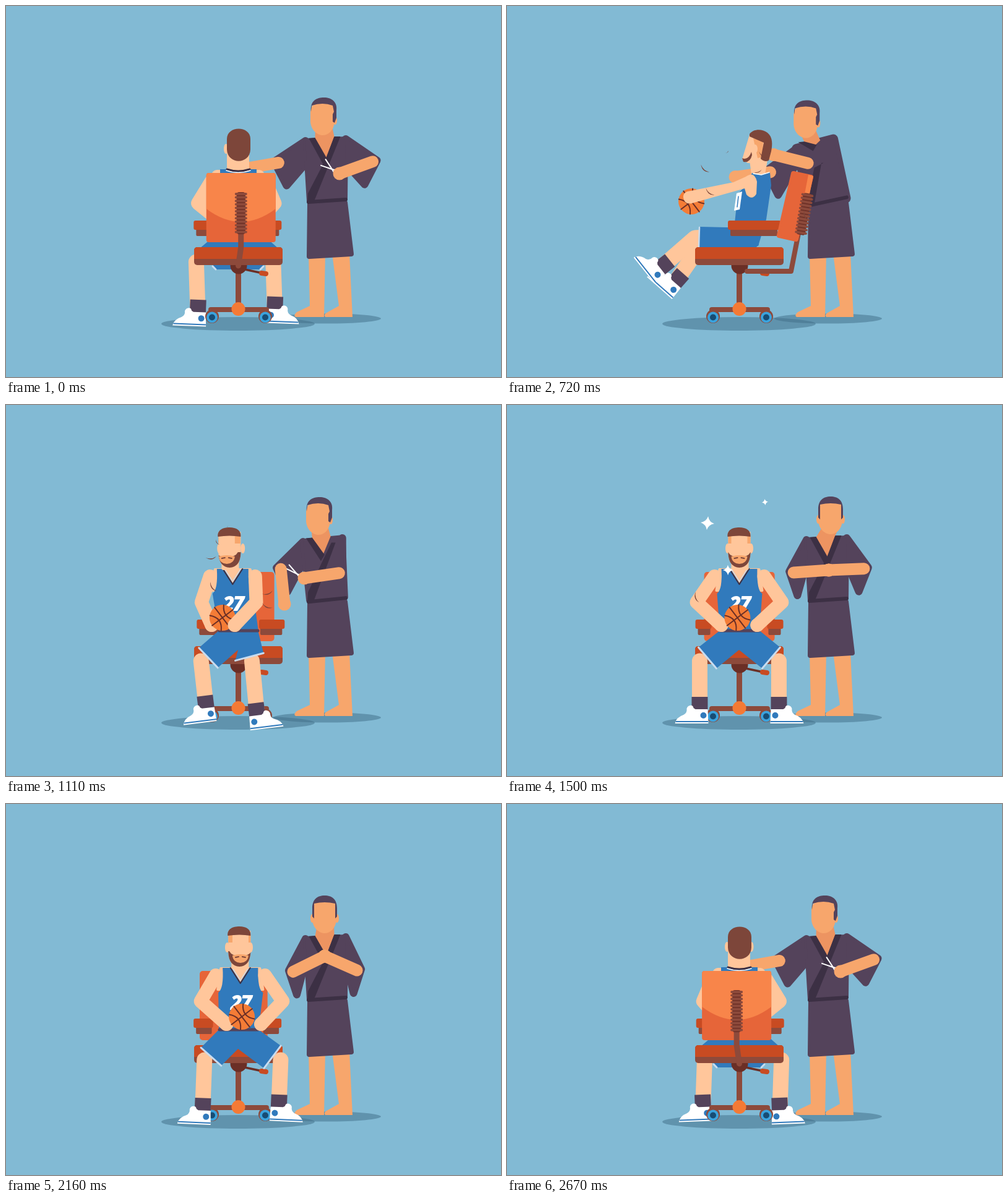
An HTML page with a canvas for the animation above (2.7 s loop, 800x600 px).

```html
<!DOCTYPE html>
<html lang="en">
<head>
<meta charset="utf-8">
<title>Haircut</title>
<style>
html, body { margin: 0; width: 100%; height: 100%; overflow: hidden; background: #82bad4; }
canvas { display: block; }
</style>
</head>
<body>
<canvas id="stage" width="800" height="600"></canvas>
<script>
const ctx = document.getElementById('stage').getContext('2d');
const LOOP = 2700, AXIS = 375.5;
const TAN = '#f7a66c', TAN_SHADE = '#ed9461', ROBE = '#54435b', TRIM = '#3c3044';
const SKIN = '#ffc69b', HAIR = '#7d463a', BLUE = '#317abc', HEM = '#c9dcef';
const RED = '#c84b22', PANEL = '#e66539', ORANGE = '#f8854a', WOOD = '#8d4a3b', DARK = '#6b2f26';

// ---- drawing helpers ----
function shape(d, color) {
  ctx.fillStyle = color;
  ctx.fill(new Path2D(d));
}
function curve(d, width, color) {
  ctx.lineWidth = width;
  ctx.strokeStyle = color;
  ctx.stroke(new Path2D(d));
}
function line(points, width, color, closed) {
  ctx.lineCap = ctx.lineJoin = 'round';
  curve('M' + points.join('L') + (closed ? 'Z' : ''), width, color);
}
function poly(points, color, round = 0) {
  if (round) line(points, round, color, true);
  shape('M' + points.join('L') + 'Z', color);
}
function oval(x, y, rx, ry, color) {
  ctx.beginPath();
  ctx.ellipse(x, y, rx, ry, 0, 0, 7);
  ctx.fillStyle = color;
  ctx.fill();
}
const disc = (x, y, r, color) => oval(x, y, r, r, color);
function box(x, y, w, h, r, color) {
  ctx.beginPath();
  ctx.roundRect(x, y, w, h, r);
  ctx.fillStyle = color;
  ctx.fill();
}
function at(x, y, angle, scaleX, scaleY, draw) {
  ctx.save();
  ctx.translate(x, y);
  ctx.rotate(angle);
  ctx.scale(scaleX, scaleY);
  draw();
  ctx.restore();
}

// ---- timing helpers ----
const mix = (a, b, k) => a + (b - a) * k;
const clamp = (v, lo, hi) => Math.min(hi, Math.max(lo, v));
const ease = k => k < .5 ? 2 * k * k : 1 - 2 * (1 - k) * (1 - k);
const ramp = (t, a, b) => ease(clamp((t - a) / (b - a), 0, 1));
const random = n => Math.abs(Math.sin(n * 127.1 + 3.7) * 43758.5) % 1;
// keys: [time, ...values]
function tween(keys, t) {
  const i = keys.findIndex(k => k[0] > t);
  const [t0, ...a] = keys[i - 1], [t1, ...b] = keys[i];
  const k = ease((t - t0) / (t1 - t0));
  return a.map((v, j) => mix(v, b[j], k));
}

// ---- barber: head x, left hand, right hand; the rest follows ----
const READY = [512, 385, 263, 539, 271], SNIP = [507, 384, 272, 473, 274];
const TRIM_FRONT = [480, 367, 277, 425, 236], PUSH = [505, 450, 322, 482, 280];
const CROSSED = [523, 520, 267, 520, 267], PALMS = [515, 515, 246, 515, 246];
const barberKeys = [[0, ...READY], [240, ...READY], [390, ...SNIP], [540, ...SNIP],
  [780, ...TRIM_FRONT], [960, ...TRIM_FRONT], [1110, ...PUSH], [1380, ...CROSSED],
  [1860, ...CROSSED], [2070, ...PALMS], [2190, ...PALMS], [2490, ...READY], [LOOP, ...READY]];

function elbowOf([sx, sy], [hx, hy], bend) {
  const dx = hx - sx, dy = hy - sy, d = Math.hypot(dx, dy);
  const h = bend * Math.sqrt(Math.max(0, 57 * 57 - d * d / 4)) / d;
  return [sx + dx / 2 - dy * h, sy + dy / 2 + dx * h];
}
function sleeve([sx, sy], [ex, ey]) {
  const out = Math.sign(ex - sx) * 7;
  poly([[sx, sy], [ex + out, ey - 2], [mix(ex, sx, .3), ey + 37], [sx, 255]], ROBE, 12);
}
function forearm(elbow, hand) {
  line([elbow, hand], 19, TAN);
  disc(...hand, 10.5, TAN);
}
function scissors([x, y], open) {
  at(x - 12, y - 7, Math.PI * 1.21, 1, 1, () => {
    for (const s of [-open, open]) {
      line([[-8, -s * 10], [0, 0], [19 * Math.cos(s), 19 * Math.sin(s)]], 2, '#fff');
    }
  });
}
function barberHead(x, y, front) {
  at(x, y, 0, 1, 1, () => {
    oval(20, 6, 3, 7, TAN);
    if (front) oval(-20, 6, 3, 7, TAN);
    shape('M-20-8Q-18-25 0-25T20-8L19 8C18 23 8 30 0 30S-19 23-20 8Z', TAN);
    shape(front
      ? 'M-20 3V-10C-20-25-12-31 0-31S20-25 20-10V3L17 6V-18Q0-22-17-18V6Z'
      : 'M-19-8C-21-26-10-31 2-31S24-24 22-10V2L19 10 16 8V-4L18-8 16-18Q0-24-18-18Z', ROBE);
  });
}
function barberRig([headX, lx, ly, rx, ry]) {
  const lean = clamp((512 - headX) / 32, 0, 1);
  const left = { shoulder: [484 - 18 * lean, 218 + 14 * lean], hand: [lx, ly] };
  const right = { shoulder: [549 - 24 * lean, 215], hand: [rx, ry] };
  left.elbow = elbowOf(left.shoulder, left.hand, clamp((lx - 410) / 30, -1, 1));
  right.elbow = elbowOf(right.shoulder, right.hand, -1);
  return { headX, lean, left, right };
}
function barber({ headX, lean, left, right }, t) {
  const m = (left.shoulder[0] + right.shoulder[0]) / 2, top = 212 + 7 * lean;
  const depth = 37 * (1 - .9 * lean), headY = 179 + 5 * lean;
  shape('M489 400H516L514 503H468Q464 500 470 495L491 485Z', TAN);
  shape('M527 400H555L560 503H516Q512 499 520 495L538 485Z', TAN);
  poly([[491, 320], [548, 318], [558, 401], [490, 405]], ROBE, 8);
  sleeve(left.shoulder, left.elbow);
  sleeve(right.shoulder, right.elbow);
  poly([left.shoulder, right.shoulder, [548, 311], [490, 316]], ROBE, mix(8, 16, lean));
  poly([[headX - 12, headY + 16], [headX + 15, headY + 16], [m + 14 - 6 * lean, top - 1], [m, top + depth], [m - 17, top + 2]], TAN_SHADE);
  poly([[m - 27, top + 2], [m - 17, top + 1], [m + 3, top + depth - 1], [m - 3, top + depth + 9]], TRIM);
  poly([[m + 14, mix(top - 1, 258, lean)], [m + 24 - 15 * lean, mix(top - 1, 258, lean)],
    [497, 318], [487, 318], [488, 303], [m - 1, mix(top + 38, 262, lean)]], TRIM);
  line([[489, 317 + 6 * lean], [549, 313 - 4 * lean]], 6, TRIM);
  barberHead(headX, headY, t > 1230 && t < 2330);
  const swinging = t < 300 || t > 2350;
  if (swinging || t < 1200) scissors(right.hand, swinging ? .33 : .11 - .11 * Math.cos((t - 420) / 24));
  forearm(right.elbow, right.hand);
}

// ---- chair ----
function wheel(x) {
  disc(x, 502, 11, WOOD);
  disc(x, 503.5, 9, '#3ba3dd');
  disc(x, 503.5, 5, '#174c74');
}
function chairBase() {
  box(327, 487, 98, 8, 4, WOOD);
  wheel(333);
  wheel(419);
  box(371, 415, 9, 72, 0, WOOD);
  disc(375.5, 490, 11, '#f47a35');
  disc(376, 420, 13.5, DARK);
  line([[386, 426], [414, 432]], 3.5, DARK);
  line([[413, 432], [420, 433]], 8, RED);
}
function seat() {
  box(304, 390, 143, 29, 5, WOOD);
  box(304, 390, 143, 19, [5, 5, 0, 0], RED);
}
function armrests(turn) {
  const extra = 20 * Math.abs(turn), shift = -5 * turn;
  for (const side of [-1, 1]) {
    at(AXIS + shift, 347, 0, side, 1, () => {
      box(47 - extra, 12, 20 + extra, 13, 2, WOOD);
      box(45 - extra, 0, 26 + extra, 15, 3, RED);
    });
  }
}
function spring(x, y) {
  box(x - 7, y, 14, 68, 4, DARK);
  for (let i = 0; i < 12; i++) line([[x - 8, y + 3 + i * 5.6], [x + 8, y + 3 + i * 5.6]], 4, WOOD);
}

// ---- player: parts sit on a turntable, facing the viewer at angle 0 ----
function turntable(angle) {
  const s = Math.sin(angle), c = Math.cos(angle);
  return { s, c, x: (offset, depth) => AXIS + offset * c + depth * s };
}
function shoe(x, y, dir, angle) {
  at(x, y, angle, dir, 1, () => {
    box(-13, -19, 26, 22, 0, ROBE);
    shape('M-16-5Q-11-6-10-1L-7 1H13L14 24H-40Q-38 14-26 10-20 7-21 0-20-4-16-5Z', '#fff');
    line([[-38, 21], [13, 21]], 2, BLUE);
    disc(6, 11, 5, BLUE);
  });
}
function leg(points, dir, angle) {
  line(points, 25, SKIN);
  shoe(...points[points.length - 1], dir, angle);
}
function legs({ s, c, x }) {
  for (const side of [-1, 1]) {
    const near = Math.max(-10, -64 * side * s);
    leg([[x(64 * side, 25), 414], [x(64 * side, 14), 491 + .2 * near]],
      -side * Math.sign(c), .16 * s * Math.sign(c));
  }
}
function ball(x, y) {
  disc(x, y, 21, '#f47c36');
  at(x, y, -.65, 1, 1, () => curve('M-21 0H21M0-21V21M-14-15Q0 0-14 15M14-15Q0 0 14 15', 2, DARK));
}

function playerBack(rig) {
  const { s, c, x } = rig, panel = x(0, -18);
  legs(rig);
  for (const side of [-1, 1]) {
    line([[AXIS + side * 44, 284], [x(64 * -side, 14), 319], [AXIS + side * 42, 338]], 22, SKIN);
  }
  box(332, 265, 86, 25, 9, SKIN);
  box(346, 264, 59, 110, 0, BLUE);
  poly([[332, 376], [422, 376], [440, 392], [410, 426], [340, 426], [313, 392]], BLUE);
  line([[334, 421], [339, 426]], 3, HEM);
  line([[411, 426], [416, 421]], 3, HEM);
  oval(355.5, 231, 3.5, 8, SKIN);
  if (s > 0) oval(395, 231, 3.5, 8, SKIN);
  shape('M357 235H393V264Q375 271 357 264Z', SKIN);
  curve('M357 264Q375 270 394 264', 3, TRIM);
  curve('M356 266Q375 273 395 266', 1.5, '#fff');
  shape('M357 215C357 193 395 193 395 215V232C394 257 358 257 357 232Z', HAIR);
  armrests(-s);
  chairBase();
  box(panel - 56, 270, 112, 112, 4, PANEL);
  shape(`M${panel - 56} 328V274q0-4 4-4h104q4 0 4 4V328Q${panel} 370 ${panel - 56} 328Z`, ORANGE);
  seat();
  line([[panel, 369], [panel, 390], [375.5, 420]], 9, WOOD);
  spring(panel, 301);
}

function playerSide(lift) {
  const to = (a, b) => a.map((v, i) => mix(v, b[i], lift));
  chairBase();
  line([[471, 368], [459, 429], [388, 429]], 8, WOOD);
  leg([[345, 382], to([316, 390], [308, 391]), to([318, 490], [251, 427])], 1, 1.05 * lift);
  leg([[350, 372], to([312, 384], [300, 371]), to([302, 494], [224, 391])], 1, 1.31 * lift);
  shape('M391 243L421 249 417 272H395Z', SKIN);
  shape('M396 270Q412 275 425 269L427 290 419 345 406 388H364L373 304 386 290Z', BLUE);
  line([[398, 271], [411, 273], [424, 269]], 1.5, '#fff');
  shape('M371 303L380 300 376 329 367 331Z', '#fff');
  line([[374, 308], [372, 325]], 1.5, BLUE);
  shape('M311 357L400 359 407 386 402 391H309Z', BLUE);
  line([[311, 358], [310, 390]], 2.5, HEM);
  seat();
  box(361, 360, 76, 12, 2, WOOD);
  box(357, 347, 86, 15, 3, RED);
  poly([[463, 271], [491, 277], [467, 377], [440, 371]], PANEL, 8);
  poly([[487, 273], [495, 275], [489, 304], [481, 304]], ORANGE);
  at(486, 303, .17, 1, 1, () => spring(0, 0));
  ball(298, 316);
  shape('M386 276Q400 266 404 284L403 304Q396 315 387 305L384 295 299 319Q287 322 285 310 284 300 297 299L366 285Z', SKIN);
  shape('M392 208L417 216 416 253 389 254 380 248Z', SKIN);
  shape('M398 214L414 218 413 244 405 246Z', TAN);
  oval(401, 231, 4, 7, SKIN);
  shape('M380 246Q390 250 395 236L396 241Q393 254 382 252Z', HAIR);
  shape('M392 207C399 198 413 199 421 205 430 212 429 225 427 235L423 250Q416 253 410 247L415 221 392 211Z', HAIR);
}

function playerFrontHead(x, turn) {
  at(x, 0, 0, 1, 1, () => {
    box(-13, 245, 28, 22, 3, SKIN);
    for (const side of [-1, 1]) oval(side * 19 - turn * 3, 232, 3.5, 8, SKIN);
    const face = 'M-18 205H18V240Q17 262 0 263-17 262-18 240Z';
    shape(face, SKIN);
    ctx.save();
    ctx.clip(new Path2D(face));
    ctx.translate(turn * 6, 0);
    box(-22, 211, 9, 13, 0, TAN);
    box(13, 211, 9, 13, 0, TAN);
    shape('M-25 238H-18Q-14 246 0 246T18 238H25V265H-25Z', HAIR);
    shape('M-13 245Q0 241 13 245 12 256 0 257-12 256-13 245Z', TAN);
    line([[-8, 248], [-3, 247]], 2, HAIR);
    line([[3, 247], [8, 248]], 2, HAIR);
    ctx.restore();
    shape('M-19 213C-20 202-11 198 0 198S19 203 18 213Q0 210-19 213Z', HAIR);
  });
}
function shortsHem(side, kneeX) {
  const d = 64 - side * (kneeX - AXIS);
  return [[kneeX + side * (2 + .4 * d), 392 + .22 * d], [kneeX - side * 27, 426 - .3 * d]];
}
function playerFront(rig) {
  const { s, c, x } = rig;
  const m = AXIS + 12 * s, half = 29 * (2 + c) / 3;
  const sl = m - half, sr = m + half;
  const arm = side => {
    const hand = [x(29 * side, 32), 356];
    line([[m + side * (half + 11), 277], [x(69 * side, 20), 319], hand], 22, SKIN);
    disc(...hand, 11, SKIN);
  };
  chairBase();
  box(x(-57, -28), 270, 114 * c, 112, 5, PANEL);
  seat();
  armrests(s);
  legs(rig);
  const left = shortsHem(-1, x(-64, 25)), right = shortsHem(1, x(64, 25));
  poly([[345, 364], [407, 364], ...right, [375, 396], left[1], left[0]], BLUE);
  line(left, 3, HEM);
  line(right, 3, HEM);
  poly([[sl - 3, 266], [sr + 3, 266], [sr + 8, 300], [sl - 8, 300]], SKIN, 4);
  shape(`M${sl} 265H${sr}Q${sr - 1} 300 ${sr + 8} 305L408 367H344L${sl - 7} 305Q${sl + 2} 298 ${sl} 265Z`, BLUE);
  line([[345, 365], [407, 365]], 5, ROBE);
  poly([[m - 15, 264], [m + 15, 264], [m, 288]], SKIN);
  line([[m - 16, 265], [m, 290], [m + 16, 265]], 2, TRIM);
  line([[m - 13, 265], [m, 285], [m + 13, 265]], 1.2, HEM);
  ctx.font = 'italic 800 condensed 33px "Open Sans", sans-serif';
  ctx.letterSpacing = '-3px';
  ctx.textAlign = 'center';
  ctx.fillStyle = '#fff';
  ctx.fillText('27', m, 333);
  arm(-1);
  ball(x(-3, 31), 344);
  arm(1);
  playerFrontHead(AXIS + 24 * s * Math.abs(s), s);
}

// ---- loose hair and sparkles ----
function looseHair(t) {
  for (let i = 0; i < 20; i++) {
    const age = t - 390 - i * 45;
    if (age < 0 || age > 260) continue;
    const side = random(i) < .68 ? -1 : 1, size = Math.min(1, .2 + age / 120);
    const x = 376 + side * (18 + age * mix(.1, .4, random(i + 50)));
    const y = 195 + 50 * random(i + 100) + age * .4;
    at(x, y, (random(i + 150) - .5) * 2 + age * .002, size, size,
      () => shape('M-9-3Q0 3 9-1 0 6-9-3Z', HAIR));
  }
}
function sparkles(t) {
  for (const [start, x, y, r] of [[1290, 324, 191, 11], [1410, 417, 157, 8], [1350, 357, 267, 9]]) {
    const k = (t - start) / 420;
    if (k <= 0 || k >= 1) continue;
    const s = r * Math.sin(Math.PI * k);
    at(x, y, .1 + (k - .5) * .8, s, s, () => shape('M0-1Q.2-.2 1 0 .2.2 0 1-.2.2-1 0-.2-.2 0-1Z', '#fff'));
  }
}

// Chair angle: back, a stop side-on, front, then round to the back again
const turnKeys = [[0, 3.38], [540, 3.38], [640, 4.71], [1020, 4.71], [1110, 5.41], [1350, 6.28],
  [2040, 6.28], [2160, 6.56], [2420, 7.85], [2670, 9.18], [LOOP, 9.66]];

function draw(t) {
  const worker = barberRig(tween(barberKeys, t)), rig = turntable(tween(turnKeys, t)[0]);
  const side = Math.abs(rig.s) > .85, front = !side && rig.c > 0;
  const reach = () => forearm(worker.left.elbow, worker.left.hand);
  ctx.fillStyle = '#82bad4';
  ctx.fillRect(0, 0, 800, 600);
  oval(519, 505.5, 87, 8, 'rgba(65,110,136,.5)');
  oval(375, 514, 124, 11, 'rgba(65,110,136,.5)');
  barber(worker, t);
  if (!front) reach();
  if (front) {
    playerFront(rig);
    reach();
  } else if (!side) {
    playerBack(rig);
  } else {
    const facing = -Math.sign(rig.s);
    const lift = ramp(t, 600, 800) - ramp(t, 960, 1060);
    at(facing < 0 ? 2 * AXIS : 0, 0, 0, facing, 1, () => playerSide(lift));
  }
  looseHair(t);
  sparkles(t);
}
const start = performance.now();
function tick() {
  draw((performance.now() - start) % LOOP);
  requestAnimationFrame(tick);
}
tick();
</script>
</body>
</html>
```
